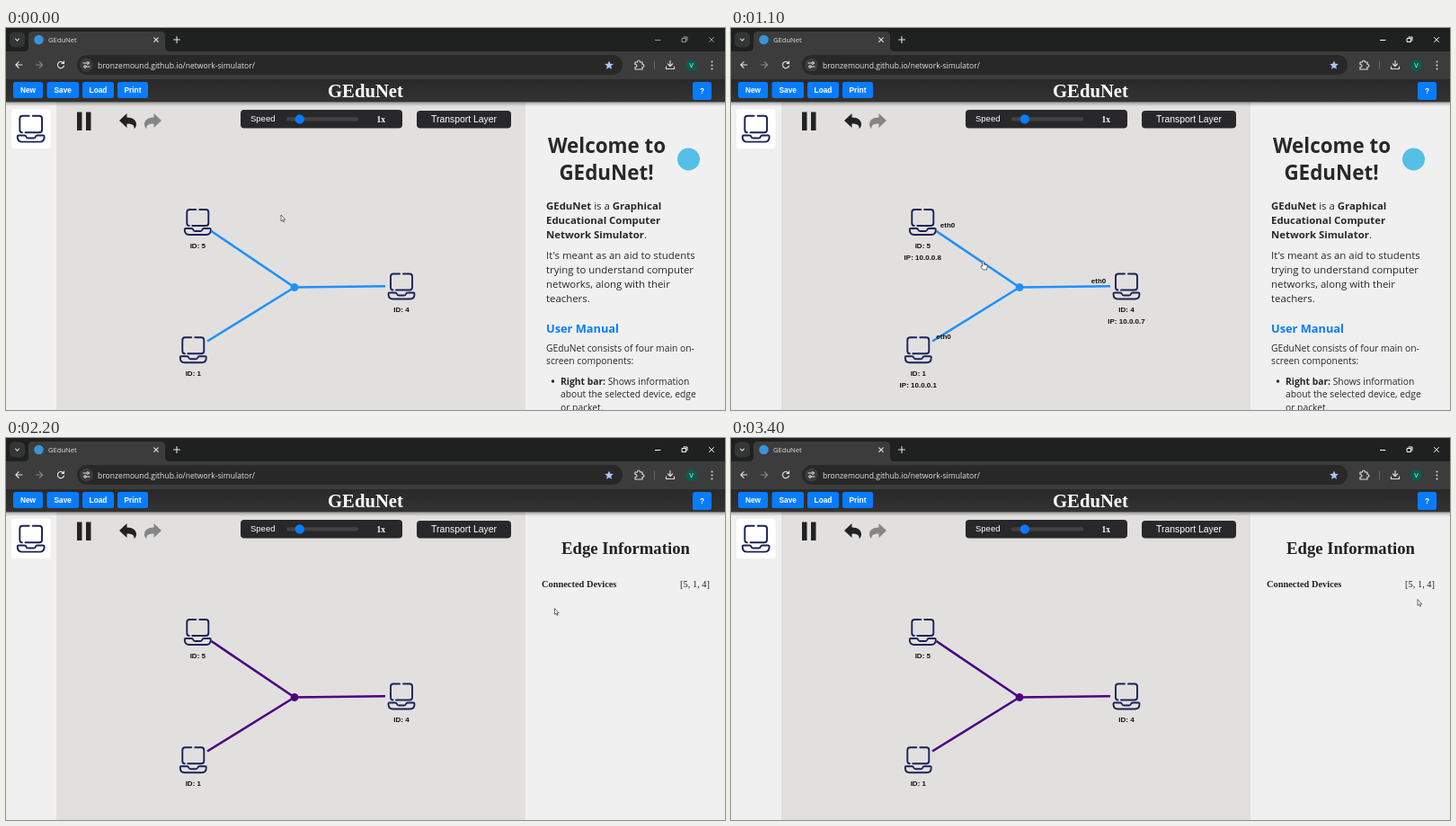
An HTML page for the animation above (3.5 s loop, 800 by 425 pixels).

```html
<!DOCTYPE html>
<html lang="en">
<head>
<meta charset="utf-8">
<title>Network simulator</title>
<style>
html, body { margin: 0; width: 100%; height: 100%; overflow: hidden; background: #e2e0df; }
svg { display: block; }
text { font-family: "Liberation Sans", Arial, sans-serif; }
.ui, .ui text { font-family: "Open Sans", "Noto Sans", sans-serif; }
.serif { font-family: "Liberation Serif", Times, serif; font-weight: bold; }
.b, .tag text { font-weight: bold; }
.tag text { font-size: 8px; text-anchor: middle; fill: #111; }
.line { fill: none; stroke-linecap: round; stroke-linejoin: round; }
</style>
</head>
<body>
<svg width="800" height="425" viewBox="0 0 800 425">
  <defs>
    <linearGradient id="bar" x2="0" y2="1">
      <stop stop-color="#292929"/><stop offset="1" stop-color="#333"/>
    </linearGradient>
    <linearGradient id="shade" x2="0" y2="1">
      <stop stop-color="#000" stop-opacity=".3"/><stop offset="1" stop-color="#000" stop-opacity="0"/>
    </linearGradient>
    <g id="pc" class="line" stroke="#1a2355" stroke-width="1.9">
      <path d="M-2-14h-7q-3 0-3 3v12q0 3 2.5 3M2-14h7q3 0 3 3v12q0 3-3 3h-15"/>
      <path d="M-13.5 7h6.5q1.5 0 2 1.5t2 1.5h6q1.500 0 2-1.500t2-1.500h6.500q1 0 1 1.500c0 3.500-2 5.500-5 5.500h-19c-3 0-5-2-5-5.500q0-1.500 1-1.500z"/>
    </g>
    <path id="turn" d="M126 103l8.500-8v4.500c7 0 10.500 3.500 10.500 7.500 0 2.500-1 4-2.500 5 .6-4-2-5.500-8-5.500v4.500z"/>
  </defs>

  <!-- Browser window -->
  <g class="ui">
    <rect width="800" height="58" fill="#1f2020"/>
    <rect x="4" y="4.500" width="17" height="17" rx="5" fill="#343535"/>
    <path d="M20 26q5 0 5-5v-12q0-5 5-5h142q5 0 5 5v12q0 5 5 5h618v32H0V26z" fill="#3c3c3c"/>
    <circle cx="36.500" cy="13" r="5.300" fill="#3b93d6"/>
    <text x="47" y="16" font-size="7.600" fill="#e3e3e3">GEduNet</text>
    <g class="line" stroke="#e3e3e3" stroke-width="1.100">
      <path d="M10.500 12l2 2.200 2-2.200M164.700 10.800l4.600 4.600m0-4.600l-4.600 4.600M186.500 13h7M190 9.500v7"/>
      <path d="M18 41h-7m3.200-3.300l-3.300 3.300 3.300 3.300"/>
      <path d="M33.500 41h7m-3.200-3.300l3.300 3.300-3.300 3.300" stroke="#858585"/>
      <path d="M64 39a3.600 3.600 0 1 0 .5 3M64.500 37v2.400h-2.400"/>
    </g>
    <g id="win" class="line" stroke-width="1">
      <path d="M722.500 13.500h5.500M782.500 10.500l5 5m0-5l-5 5"/>
      <path d="M752.500 11.500h4v4h-4zM754 10h4v4"/>
    </g>
    <rect x="79" y="30" width="607" height="22" rx="11" fill="#282828"/>
    <circle cx="89.500" cy="41" r="7.500" fill="#3c3c3c"/>
    <g class="line" stroke="#e3e3e3" stroke-width="1">
      <path d="M86 39h2.500M90.500 43h2.500"/>
      <circle cx="91" cy="39" r="1.300"/><circle cx="88" cy="43" r="1.300"/>
    </g>
    <text x="102" y="44.500" font-size="8.600" fill="#e3e3e3">bronzemound.github.io/network-simulator/</text>
    <path d="M671 36.500l1.400 3.200 3.500.3-2.700 2.300.8 3.400-3-1.800-3 1.800.8-3.400-2.700-2.300 3.500-.3z" fill="#a8c7fa"/>
    <g class="line" stroke="#dedede" stroke-width="1.200">
      <path d="M700 38h2.500q0-2 1.500-2t1.500 2h2.500v2.500q2 0 2 1.500t-2 1.500v2.500h-8v-2.500q2 0 2-1.500t-2-1.500z"/>
      <path d="M739 36.500v6m-2.700-2.700l2.700 2.700 2.700-2.700M734.500 43v2.500h9V43"/>
      <path d="M721.500 37v9" stroke="#666" stroke-width="1"/>
    </g>
    <circle cx="762.500" cy="41.500" r="6.300" fill="#075e50"/>
    <text x="762.500" y="44.200" font-size="7.500" text-anchor="middle" fill="#e8f4ef">V</text>
    <path d="M785.500 37.500v0m0 4v0m0 4v0" class="line" stroke="#e3e3e3" stroke-width="1.900"/>
  </g>

  <!-- Page -->
  <rect y="82" width="56" height="343" fill="#f0f0f0"/>
  <rect x="578" y="82" width="222" height="343" fill="#f0f0f0"/>
  <rect y="82.500" width="800" height="4.500" fill="url(#shade)"/>
  <rect y="57" width="800" height="25.500" fill="url(#bar)"/>
  <text x="400" y="76.700" class="serif" font-size="20.700" text-anchor="middle" fill="#fff">GEduNet</text>
  <g id="buttons" class="b" font-size="8.300" text-anchor="middle"></g>
  <rect x="6" y="90" width="43.500" height="44" rx="3" fill="#fff"/>
  <use href="#pc" transform="translate(27.700 112.200) scale(1.030)"/>
  <path d="M79 93.500h5.500v20.500h-5.500zM89 93.500h5.500v20.500h-5.500z" fill="#222"/>
  <use href="#turn" fill="#222"/>
  <use href="#turn" fill="#858585" transform="matrix(-1 0 0 1 299 0)"/>
  <g fill="#fff">
    <rect x="261" y="91" width="180" height="20.500" rx="4" fill="#28282a"/>
    <text x="272" y="104.300" font-size="9.500">Speed</text>
    <rect x="312" y="99.300" width="80" height="4.200" rx="2" fill="#424244"/>
    <circle cx="326.800" cy="101.400" r="5.200" fill="#087cff"/>
    <text x="412.500" y="104.700" class="serif" font-size="9.500">1x</text>
    <rect x="457" y="92" width="105" height="19.500" rx="4" fill="#28282a"/>
    <text x="509.500" y="105.200" font-size="10.400" text-anchor="middle">Transport Layer</text>
  </g>

  <g id="edge">
    <path d="M228.500 226L321 288.500 422 287.300M321 288.500L224 348.500" fill="none" stroke-width="2.600"/>
    <circle cx="321" cy="288.500" r="4"/>
  </g>
  <g id="nodes" class="tag"></g>
  <g id="details" class="tag"></g>

  <!-- Right bar -->
  <g id="welcome" class="ui" fill="#28282a">
    <g class="b" font-size="22.400" text-anchor="middle">
      <text x="668.500" y="138.500">Welcome to</text><text x="668" y="168.500">GEduNet!</text>
    </g>
    <circle cx="759.500" cy="146" r="12.500" fill="#55bfe6"/>
    <g font-size="11.400">
      <text x="601" y="201.500"><tspan class="b">GEduNet</tspan> is a <tspan class="b">Graphical</tspan></text>
      <text x="601" y="217.500" class="b">Educational Computer</text>
      <text x="601" y="233.500"><tspan class="b">Network Simulator</tspan>.</text>
      <text x="601" y="257.300">It's meant as an aid to students</text>
      <text x="601" y="273.200">trying to understand computer</text>
      <text x="601" y="289.100">networks, along with their</text>
      <text x="601" y="305">teachers.</text>
    </g>
    <text x="601" y="339" class="b" font-size="12.800" fill="#087cff">User Manual</text>
    <g font-size="10.300">
      <text x="601" y="360">GEduNet consists of four main on-</text>
      <text x="601" y="374.300">screen components:</text>
      <circle cx="608.500" cy="393" r="1.700"/>
      <text x="617" y="396.500"><tspan class="b">Right bar:</tspan> Shows information</text>
      <text x="617" y="411">about the selected device, edge</text>
      <text x="617" y="425.500">or packet.</text>
    </g>
  </g>
  <g id="info" fill="#222">
    <text x="689.500" y="129" class="serif" font-size="18.700" text-anchor="middle">Edge Information</text>
    <text x="596" y="166" class="serif" font-size="10.400">Connected Devices</text>
    <text x="783" y="166" class="serif" font-size="10.400" text-anchor="end" style="font-weight:400">[5, 1, 4]</text>
  </g>

  <g id="cursor" fill="#fff" stroke="#333" stroke-width=".7" stroke-linejoin="round">
    <path id="arrow" d="M0 0v7l1.500-1.400 1.100 2.300 1.100-.5-1.100-2.200h2.100z"/>
    <path id="hand" d="M-.9 0q.9-1.200 1.800 0v3l3 .7q.9.300.8 1.500l-.6 3.800h-4.100l-2.600-3.500q.3-1.300 1.700-.3z"/>
  </g>
</svg>
<script>
const $ = id => document.getElementById(id);
const show = (id, on) => $(id).setAttribute('display', on ? 'inline' : 'none');
const label = (x, y, s) => `<text x="${x}" y="${y}">${s}</text>`;

$('buttons').innerHTML = [['New', 8, 33], ['Save', 45.5, 35.5], ['Load', 85, 35], ['Print', 124, 34], ['?', 764, 21]]
  .map(([s, x, w]) => `<rect x="${x}" y="60" width="${w}" height="${s === '?' ? 20 : 18}" rx="2.500" fill="#087cff"/>
    <g fill="#fff">${label(x + w / 2, s === '?' ? 73 : 72, s)}</g>`).join('');

// id, icon centre, last byte of the address, interface label
for (const [id, x, y, ip, ex, ey] of [
  [5, 213.3, 216, 8, 241, 222.3], [4, 440, 287.5, 7, 409, 284.2], [1, 208.3, 358.3, 1, 236.5, 345.5]
]) {
  $('nodes').innerHTML += `<use href="#pc" x="${x}" y="${y}"/>` + label(x, y + 28.8, 'ID: ' + id);
  $('details').innerHTML += label(x, y + 41.5, 'IP: 10.0.0.' + ip) + label(ex, ey, 'eth0');
}

// time, x, y of the pointer tip
const path = [[0, 306, 208], [100, 306, 208], [500, 290, 237], [700, 280.5, 260], [1500, 280.5, 260],
  [2200, 610.5, 189.5], [2600, 742, 171], [3000, 764, 179.5], [3500, 764, 179.5]];

function pointer(t) {
  const i = path.findIndex(p => p[0] > t);
  const [t0, x0, y0] = path[i - 1], [t1, x1, y1] = path[i];
  const k = (t - t0) / (t1 - t0);
  return [x0 + (x1 - x0) * k, y0 + (y1 - y0) * k];
}

function draw() {
  const t = Math.floor(performance.now() % 3500 / 100) * 100;
  const hover = t >= 700 && t < 1600, selected = t >= 1200;
  show('details', hover);
  show('hand', hover);
  show('arrow', !hover);
  show('welcome', !selected);
  show('info', selected);
  const color = selected ? '#4b0082' : '#1e90ff';
  $('edge').setAttribute('fill', color);
  $('edge').setAttribute('stroke', color);
  $('win').setAttribute('stroke', t < 1000 ? '#9a9a9a' : '#fff');
  $('win').setAttribute('fill', 'none');
  $('cursor').setAttribute('transform', `translate(${pointer(t)})`);
  requestAnimationFrame(draw);
}
draw();
</script>
</body>
</html>
```
